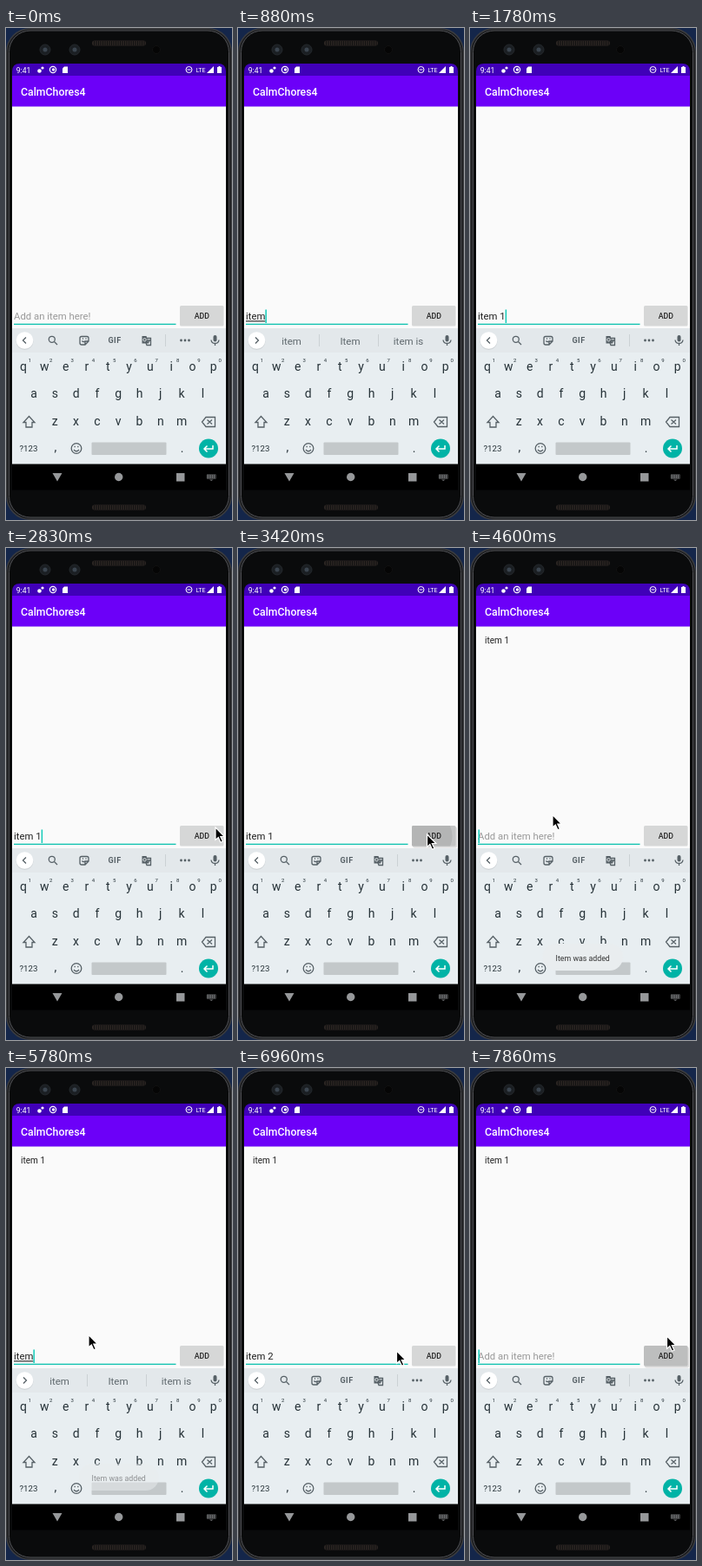
An HTML page that plays this animation: 260 by 567 pixels, repeating every 8000 ms.

```html
<!DOCTYPE html>
<html lang="en">
<head>
<meta charset="utf-8">
<title>To-do list</title>
<style>
  html, body { margin: 0; width: 100%; height: 100%; overflow: hidden; background: #14264a; }
  svg { display: block; width: 260px; height: 567px; }
  text { font-family: Roboto, sans-serif; white-space: pre; }
  .mid { text-anchor: middle; }
  .medium { font-weight: 500; }
  .line { fill: none; stroke: #566066; stroke-width: 1.3; }
  .grille { stroke: #2b2522; stroke-width: 6; stroke-linecap: round; }
  .mesh { stroke: #111; stroke-width: 5; stroke-dasharray: 1 1.5; }
  .chip { font-size: 11.5px; fill: #5f686d; }
</style>
</head>
<body>
<svg viewBox="0 0 260 567">
  <defs><clipPath id="buttonClip"><rect x="200" y="320" width="50.5" height="23.5" rx="1.5"/></clipPath></defs>

  <!-- phone body -->
  <rect x=".7" y=".7" width="258.600" height="565.600" rx="27" fill="#1b1c1e" stroke="#3c3d40" stroke-width="1.400"/>
  <rect x="3.500" y="3" width="253" height="561" rx="24.500" fill="#0a0b0c" stroke="#515256"/>
  <path class="grille" d="M102 17.500H158M102 552.500H158"/>
  <path class="mesh" d="M101 17.500H160M101 552.500H160"/>
  <g fill="#1b1f23" stroke="#25292d">
    <circle cx="45" cy="25" r="6"/><circle cx="79" cy="25" r="6"/>
    <circle cx="173" cy="25" r="4.500" fill="#050505" stroke="#111"/>
  </g>
  <g fill="#3b454f"><circle cx="45" cy="25" r="2.500"/><circle cx="79" cy="25" r="2.500"/></g>

  <!-- status and title bars -->
  <rect x="7" y="90" width="246" height="413" fill="#fafafa"/>
  <path d="M7 56V50Q7 41 16 41H244Q253 41 253 50V56Z" fill="#4000b8"/>
  <rect x="7" y="55" width="246" height="35.500" fill="#6c00f8"/>
  <g fill="#fff">
    <text x="11.700" y="51.500" font-size="8.700">9:41</text>
    <circle cx="38.500" cy="49.500" r="2.300"/><circle cx="42" cy="46" r="1.600"/>
    <circle cx="54" cy="48" r="3.600" fill="none" stroke="#fff" stroke-width="1.200"/><circle cx="54.500" cy="48" r="1.700"/>
    <path d="M67 44.500H71V52H65V46.500Z"/>
    <circle cx="210.500" cy="48" r="3.500" fill="none" stroke="#fff"/><path d="M208.500 47.500H212.500V48.500H208.500Z"/>
    <text x="218.500" y="51" font-size="7">LTE</text>
    <path d="M239 44V52H231Z"/><path d="M243 45H244.500V44H246.500V45H248V52H243Z"/>
    <text x="17" y="78" font-size="12.300" class="medium">CalmChores4</text>
  </g>

  <!-- list and entry row -->
  <text id="listItem" x="17" y="109.500" font-size="10.100" fill="#222">item 1</text>
  <text id="entry" x="9" y="336.300" font-size="11.350"></text>
  <rect id="caret" y="324.500" width="1.500" height="15.500" fill="#13cbb9"/>
  <rect x="9" y="340.700" width="186.500" height="1.400" fill="#13c2b1"/>
  <rect id="shadow" x="201" y="321.500" width="51" height="24" rx="2" fill="#000" opacity=".12"/>
  <g clip-path="url(#buttonClip)">
    <rect id="button" x="200" y="320" width="51" height="24"/>
    <circle id="ripple" cx="218" cy="332" r="28.500" fill="#b4b5b5"/>
  </g>
  <text x="225.300" y="335" font-size="8.750" class="mid medium" fill="#222">ADD</text>

  <!-- keyboard -->
  <rect x="7" y="346" width="246" height="157" fill="#e8eef1"/>
  <rect x="7" y="346" width="246" height="28" fill="#e3e8eb"/>
  <circle cx="21.500" cy="361" r="10" fill="#cfd4d7"/>
  <circle cx="21.500" cy="360" r="9.800" fill="#fff"/>
  <path id="chevron" class="line"/>
  <g id="tools">
    <g class="line">
      <circle cx="52.800" cy="358.800" r="3.500"/><path d="M55.500 361.500L59 365"/>
      <path d="M87 355.500H93Q95 355.500 95 357.500V361L91 365H87Q85 365 85 363V357.500Q85 355.500 87 355.500M95 361H91V365M87.500 360.500Q89 362.500 91 361M88 358H89M91.500 358H92.500"/>
      <path d="M162 357.500H166.500V365.500H162L161 363M163 360H166M165 360L163.500 363"/>
    </g>
    <path d="M156.500 355H161.500L164 363.500H156.500Z" fill="#566066"/>
    <circle cx="159.500" cy="359.300" r="1.700" fill="none" stroke="#e3e8eb"/>
    <text x="125" y="363.300" font-size="9" font-weight="700" letter-spacing=".5" class="mid" fill="#566066">GIF</text>
    <path d="M183.500 353V367" stroke="#cbd1d4"/>
    <g fill="#566066"><circle cx="201.500" cy="360" r="1.400"/><circle cx="206" cy="360" r="1.400"/><circle cx="210.500" cy="360" r="1.400"/></g>
  </g>
  <g id="chips">
    <path d="M93.500 353V367M161.500 353V367" stroke="#cbd1d4"/>
    <text class="chip mid" x="61.500" y="364.500"></text>
    <text class="chip mid" x="129" y="364.500"></text>
    <text class="chip mid" x="196" y="364.500"></text>
  </g>
  <rect x="238.500" y="354" width="4" height="7.500" rx="2" fill="#566066"/>
  <path class="line" d="M236 359.500Q236.500 363.500 240.500 363.500T245 359.500M240.500 363.500V366"/>
  <g id="keys" fill="#263238"></g>
  <g class="line">
    <path d="M26.500 447.500L33 454.500H30V460H23V454.500H20Z"/>
    <path d="M230 448.500H240.500V459.500H230L225.500 454ZM231.500 451.500L237 456.500M237 451.500L231.500 456.500"/>
    <circle cx="81" cy="484.500" r="5.800"/><path d="M78 486Q81 489.500 84 486M78.500 482.500H79.800M82.200 482.500H83.500"/>
  </g>
  <rect x="98.500" y="477.500" width="86" height="14.500" rx="1" fill="#c3c8ca"/>
  <circle cx="233" cy="484.500" r="11" fill="#00b3a6"/>
  <path d="M238 481V485H228.500M231.500 481.500L228 485L231.500 488.500" fill="none" stroke="#fff" stroke-width="1.500"/>
  <g id="toast">
    <rect x="83.500" y="456" width="92.500" height="31" rx="15.500" fill="#e9edef"/>
    <text x="129.700" y="475.500" font-size="8.800" class="mid" fill="#333">Item was added</text>
  </g>

  <!-- navigation bar -->
  <rect x="7" y="502.500" width="246" height="30" fill="#000"/>
  <g fill="#96989a">
    <path d="M53.500 513H64.500L59 522.500Z"/><circle cx="129.700" cy="517.500" r="4.700"/>
    <rect x="196" y="513" width="9.500" height="9.500"/>
  </g>
  <path d="M231 514.500H241.500V519.500H231ZM234 520.500H238.500L236.200 522Z" fill="#707274"/>
  <path d="M232 516H241M232 518H241" stroke="#000" stroke-dasharray="1 1"/>

  <path id="pointer" d="M0 0V14.500L3.300 11.500L5.900 17.300L8.400 16.200L5.800 10.500H10.300Z" fill="#000" stroke="#fff" stroke-width="1.200"/>
</svg>
<script>
const $ = id => document.getElementById(id);
const show = (id, on) => $(id).style.display = on ? '' : 'none';

const key = (label, x, y, size = 14) =>
  $('keys').insertAdjacentHTML('beforeend', `<text class="mid" x="${x}" y="${y}" font-size="${size}">${label}</text>`);
const row = (letters, x, y) => [...letters].forEach((c, i) => key(c, x + i * 24.3, y));
row('qwertyuiop', 20, 395);
row('asdfghjkl', 32, 426.3);
row('zxcvbnm', 56.3, 458.3);
[...'1234567890'].forEach((c, i) => key(c, 27.5 + i * 24.3, 385, 6));
key('?123', 26, 488, 9.7);
key(',', 57, 488);
key('.', 202.5, 489);

const LOOP = 8000;
// Each track holds its value from the given time until the next one.
const nextWords = 'is and in';
const typed = [
  [0, ''], [440, 'i', 'I in is'], [590, 'it', 'it It its'], [730, 'ite', 'item ite items'],
  [880, 'item', 'item Item item_is'], [1480, 'item ', nextWords], [1780, 'item 1'], [3570, ''],
  [5050, 'i', 'I in is'], [5190, 'it', 'it It its'], [5340, 'ite', 'item ite items'],
  [5640, 'item', 'item Item item_is'], [5930, 'item ', nextWords], [6220, 'item 2'], [7860, ''],
];
const caret = [
  [0, 0], [140, 1], [2230, 0], [2680, 1], [3120, 0], [3570, 1], [4150, 0], [4600, 1],
  [6670, 0], [7110, 1], [7560, 0], [7860, 1],
];
const pointer = [
  [0, 300, 312], [2680, 253, 312], [2830, 241, 322], [2970, 224, 331], [3120, 217.5, 330],
  [3860, 205, 326], [4010, 150, 313], [4150, 98, 307.5], [4300, 95, 307.5],
  [6670, 118, 309], [6820, 150, 317], [6960, 182.5, 326], [7110, 210, 329], [7260, 222, 329],
  [7410, 226, 329], [7860, 226.5, 309],
];
const toast = [[0, 0], [3570, .2], [3710, .5], [3860, .8], [4010, 1], [5640, .8], [5780, .5], [5930, 0]];
const button = [[0, '#d6d7d7'], [3420, '#c3c4c4'], [3570, '#bbb'], [3710, '#cacaca'], [3860, '#d6d7d7'], [7710, '#c3c4c4'], [7860, '#bdbebe']];
const at = (track, t) => track.findLast(k => k[0] <= t);

function draw(now) {
  const t = now % LOOP;
  const [, text, words] = at(typed, t);
  const entry = $('entry');
  entry.textContent = text || 'Add an item here!';
  entry.setAttribute('fill', text ? '#222' : '#999');
  entry.style.textDecoration = words && !text.endsWith(' ') ? 'underline' : 'none';
  $('caret').setAttribute('x', text ? 9 + entry.getComputedTextLength() : 9.5);
  show('caret', at(caret, t)[1]);
  show('listItem', t >= 3570);

  show('tools', !words);
  show('chips', words);
  $('chevron').setAttribute('d', words ? 'M20 356.500L23.500 360L20 363.500' : 'M23 356.500L19.500 360L23 363.500');
  if (words) {
    const labels = words.split(' ');
    document.querySelectorAll('.chip').forEach((chip, i) => chip.textContent = labels[i].replace('_', ' '));
  }

  const fill = at(button, t)[1];
  $('button').setAttribute('fill', fill);
  show('ripple', fill === '#c3c4c4');
  show('shadow', fill !== '#d6d7d7');
  $('toast').setAttribute('opacity', at(toast, t)[1]);
  const [, x, y] = at(pointer, t);
  $('pointer').setAttribute('transform', `translate(${x} ${y})`);
}

function tick() {
  draw(performance.now());
  requestAnimationFrame(tick);
}
tick();
</script>
</body>
</html>
```
